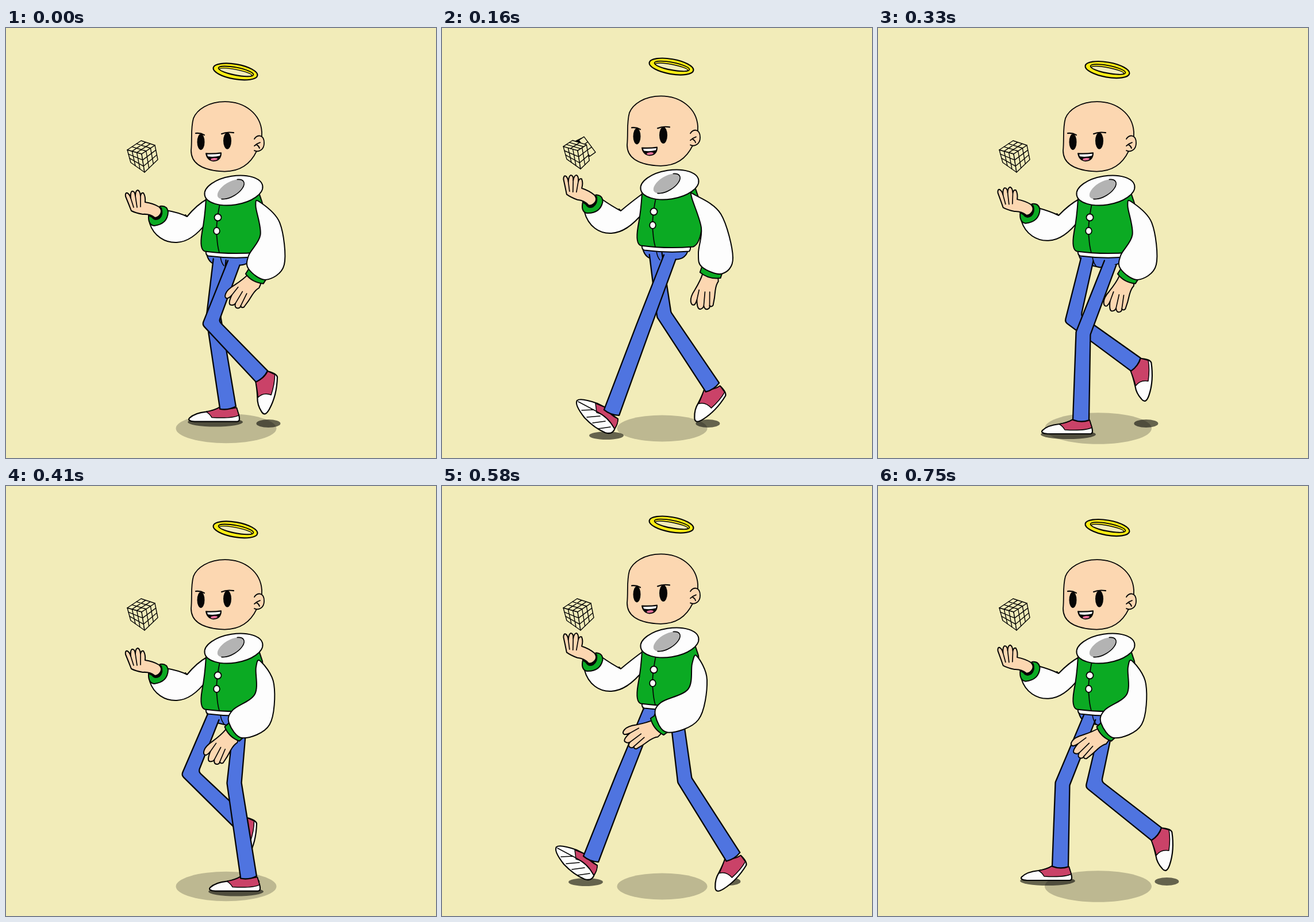
An HTML page with a canvas that plays this animation: 748x748 px, repeating every 830 ms.

```html
<!DOCTYPE html>
<html lang="en">
<head>
<meta charset="utf-8">
<title>Walk cycle</title>
<style>
html, body { margin: 0; height: 100%; overflow: hidden; background: #f2ecb9; }
canvas { display: block; width: 100vw; height: 100vh; }
</style>
</head>
<body>
<canvas id="stage" width="748" height="748"></canvas>
<script>
const ctx = document.getElementById('stage').getContext('2d');
const BG = '#f2ecb9', INK = '#050505', SKIN = '#fcd7b1', GREEN = '#0baa23',
      BLUE = '#4f74e0', RED = '#ca4268', WHITE = '#fdfdfd', YELLOW = '#fcec14';

const LOOP = 830, POSES = 10, STEP = 5;   // two steps per loop

// Key points of one leg at every second pose; the other leg runs half a loop later
const KNEE = [[356, 513], [351, 518], [357, 531], [432, 503], [398, 523]];
const ANKLE = [[445, 606], [295, 669], [353, 682], [486, 671], [503, 619]];

// Per pose of a step: torso drop and how far the open hand is raised
const DROP = [.5, -9.5, -9.5, 2.5, .5];
const RAISE = [0, .77, 1, .73, .2];

// Swinging sleeve fully back and fully forward; points 3 and 4 are the cuff
const BACK = [[434, 303], [451, 357], [446, 401], [452, 425], [487, 437], [506, 409], [485, 333], [440, 300]];
const FRONT = [[435, 319], [428, 363], [381, 386], [371, 408], [392, 438], [446, 416], [461, 347], [443, 305]];

const wave = turns => Math.cos(turns * 2 * Math.PI);
const smooth = t => { t = Math.min(1, Math.max(0, t)); return t * t * (3 - 2 * t); };
const lerp = (p, q, t) => p.map((v, i) => v + (q[i] - v) * t);

// Closed Catmull-Rom track through keys two poses apart
function track(keys, phase) {
  const k = Math.floor(phase / 2), t = phase / 2 - k;
  const [a, b, c, d] = [4, 0, 1, 2].map(n => keys[(k + n) % 5]);
  return b.map((v, i) => v + t / 2 * (c[i] - a[i] +
    t * (2 * a[i] - 5 * v + 4 * c[i] - d[i] + t * (3 * v - 3 * c[i] + d[i] - a[i]))));
}

function shape(d, fill, width = 2) {
  const p = typeof d === 'string' ? new Path2D(d) : d;
  if (fill) { ctx.fillStyle = fill; ctx.fill(p); }
  if (width) { ctx.lineWidth = width; ctx.strokeStyle = INK; ctx.stroke(p); }
}
function oval(x, y, rx, ry, deg, fill, width = 2, from = 0, to = 360) {
  const r = Math.PI / 180, p = new Path2D();
  p.ellipse(x, y, rx, ry, deg * r, from * r, to * r);
  shape(p, fill, width);
}
function at(x, y, deg, draw) {
  ctx.save();
  ctx.translate(x, y);
  ctx.rotate(deg * Math.PI / 180);
  draw();
  ctx.restore();
}
function poly(pts, fill, width) {
  shape('M' + pts.join('L') + 'Z', fill, width);
}

// Shoes drawn around the ankle, each with its shadow offset and radii
const FLAT = {
  sole: 'M-14-1Q0 4 15 0L19 13Q22 24 16 24L-58 24Q-71 23-67 18Q-58 9-38 7Q-24 5-14-1Z',
  upper: 'M-14-1Q0 4 15 0L19 13Q8 19-28 17Q-32 10-38 7Q-24 5-14-1Z',
  shade: [-22, 25, 48, 8]
};
const LIFTED = {
  sole: 'M-10 9Q4 5 9-10Q25-8 27-2Q30 30 20 55Q14 70 7 61Q-2 50-3 38Q-6 20-10 9Z',
  upper: 'M-10 9Q4 5 9-10L22-6Q24 10 20 30Q6 27-2 37Q-6 20-10 9Z',
  shade: [16, 0, 21, 7]
};
const STRIKE = {
  sole: 'M-11-9L-25-16Q-54-26-60-21Q-65-14-47 9Q-30 27-11 35Q2 39 6 27Q10 20 11 11Q0 4-11-9Z',
  upper: 'M-28-16L-11-9Q-2 5 11 11Q11 21 5 28Q-8 4-26 0Z',
  tread: 'M-58-19L-26-2Q-6 8 5 28M-52-4l21-1M-43 8l23-2M-33 18l22-3M-23 28l21-3',
  shade: [-9, 40, 30, 7]
};

function legPose(phase, bob, far) {
  const dx = far ? -36 : 0, depth = far ? 20 : 0;
  const place = ([x, y], k) => [x + dx, y - depth * k];
  const hip = place([402 + 7 * wave((phase - 6) / POSES), 408 + bob], .3);
  const knee = place(track(KNEE, phase), .65), ankle = place(track(ANKLE, phase), 1);
  const shoe = phase === 2 ? STRIKE : phase > 2 && phase < 7 ? FLAT : LIFTED;
  const fromTop = (phase + 6) % POSES - 5;   // poses from the highest lift
  const deg = shoe === LIFTED ? 10 * fromTop ** 2 - 3 : phase === 6 ? -13 : 0;
  return { hip, knee, ankle, shoe, deg };
}

function footShade({ ankle: [x, y], shoe, deg }) {
  const [dx, dy, rx, ry] = shoe.shade, up = shoe === LIFTED;
  oval(x + dx - (up ? deg * .65 : 0), up ? 688 : y + dy, rx, ry, 0, 'rgba(0,0,0,.58)', 0);
}

function leg({ hip: [hx, hy], knee: [kx, ky], ankle: [ax, ay], shoe, deg }) {
  at(ax, ay, deg, () => {
    shape(shoe.sole, WHITE, 2.2);
    shape(shoe.upper, RED, 1.5);
    if (shoe.tread) shape(shoe.tread, null, 1.6);
  });
  const unit = (x, y) => { const l = Math.hypot(x, y); return [x / l, y / l]; };
  const [ux, uy] = unit(kx - hx, ky - hy), [vx, vy] = unit(ax - kx, ay - ky);
  const m = 1 + ux * vx + uy * vy;
  const side = s => [
    [hx - uy * 11 * s, hy + ux * 11 * s],
    [kx - (uy + vy) / m * 12.5 * s, ky + (ux + vx) / m * 12.5 * s],
    [ax - vy * 14 * s, ay + vx * 14 * s]
  ];
  const a = side(1), b = side(-1), p = new Path2D();
  p.moveTo(...a[0]);
  p.arcTo(...a[1], ...a[2], 8);
  p.lineTo(...a[2]);
  p.quadraticCurveTo(ax + vx * 5, ay + vy * 5, ...b[2]);
  p.arcTo(...b[1], ...b[0], 8);
  p.lineTo(...b[0]);
  shape(p, BLUE, 2.3);
}

function raisedArm(up, bob) {
  const dx = -2.5 * up, dy = -21 * up, low = -16 * up;
  const ex = 315 - 4 * up, ey = 328 - 10 * up, by = 374 + low;
  shape(`M350 ${297 + bob}Q332 ${307 + bob * .7} ${ex} ${ey}Q${ex - 14} ${ey - 7} ${278 + dx} ${317 + dy}
    L${250 + dx} ${340 + dy}C${257 + dx} ${by - 12} ${277 + dx} ${by} ${297 + dx} ${by - 1}
    Q${324 + dx} ${by - 2} 350 ${337 + low}Z M${ex} ${ey}l-3-3`, WHITE);
  at(262 + dx, 322 + dy, 10 * up, () => {
    ctx.translate(-262, -322);
    shape('M268 310Q280 308 282 320Q281 341 258 344Q247 343 248 326Q256 332 264 326Q270 320 268 310Z', GREEN);
    shape('M252 326Q258 337 267 331Q274 324 270 313Z', INK);
    shape('M259 330Q250 323 238 324Q226 322 218 318Q213 305 208 293Q207 286 211 287Q215 289 217 296' +
      'Q216 286 219 284Q224 283 225 292Q225 283 229 282Q233 283 234 292Q235 286 239 287' +
      'Q243 293 242 303Q256 305 266 311Q272 316 269 323Q265 330 259 330Z', SKIN);
    shape('M217 296L222 312M225 292L228 312M234 292L234 311', null, 1.7);
  });
}

function swingArm(pose) {
  const off = Math.abs(pose - 7), away = Math.min(off, POSES - off);
  const forward = smooth((4.4 - away) / 3.4);
  const pts = BACK.map((p, i) => lerp(p, FRONT[i], forward));
  const [ax, ay] = pts[3], [bx, by] = pts[4], mx = (ax + bx) / 2, my = (ay + by) / 2;
  const l = Math.hypot(bx - ax, by - ay), nx = (ay - by) / l, ny = (bx - ax) / l;
  at(mx + nx * 9, my + ny * 9, 10 + 26 * wave((pose - 7.6) / POSES), () => {
    shape('M-12-6C-18 4-28 14-32 18Q-43 28-44 36Q-45 44-39 43Q-35 40-33 36Q-37 53-31 53Q-26 53-24 49' +
      'Q-24 57-18 56Q-14 55-14 51Q-12 55-8 52Q-2 40 2 28Q6 18 11 14Q13 8 12 2Z', SKIN);
    shape('M-33 36L-25 20M-24 49L-16 26M-14 51L-8 28', null, 1.7);
  });
  shape(`M${ax} ${ay}L${ax + nx * 10} ${ay + ny * 10}
    Q${mx + nx * 17} ${my + ny * 17} ${bx + nx * 8} ${by + ny * 8}L${bx} ${by}Z`, GREEN);
  const n = pts.length, p = new Path2D();
  p.moveTo(...pts[0]);
  for (let i = 0; i < n; i++) {
    const [a, b, c, d] = [n - 1, 0, 1, 2].map(k => pts[(i + k) % n]);
    p.bezierCurveTo(b[0] + (c[0] - a[0]) / 6, b[1] + (c[1] - a[1]) / 6,
      c[0] - (d[0] - b[0]) / 6, c[1] - (d[1] - b[1]) / 6, c[0], c[1]);
  }
  p.closePath();
  shape(p, WHITE);
}

function grid(a, b, c, d, nu, nv) {
  let s = '';
  for (let i = 1; i < nu; i++) s += `M${lerp(a, b, i / nu)}L${lerp(d, c, i / nu)}`;
  for (let i = 1; i < nv; i++) s += `M${lerp(a, d, i / nv)}L${lerp(b, c, i / nv)}`;
  poly([a, b, c, d], BG, 1.4);
  shape(s, null, 1.4);
}

// The back layer of the cube twists out around pose 2
function cube(pose) {
  const twist = Math.max(0, 1 - Math.abs(pose - 2.2) / 1.2), turned = twist > .01;
  const left = [211, 212], front = [236, 219], bottom = [241, 251];
  const n = turned ? 2 : 3, depth = n / 3;
  const top = lerp(left, [235, 196], depth), right = lerp(front, [259, 204], depth),
        low = lerp(bottom, [264, 229], depth);
  at(0, -7 * twist, 0, () => {
    if (turned) {
      poly([[231, 203], [243, 197], [264, 224], [252, 232]], INK, 1);
      grid([238, 201], [247, 195], [267, 222], [257, 229], 1, 3);
    }
    grid(left, front, bottom, [217, 234], 3, 3);
    grid(front, right, low, bottom, n, 3);
    grid(left, top, right, front, 3, n);
  });
}

function halo() {
  oval(399, 76, 39, 13, 10, YELLOW, 2.2);
  oval(400, 75.5, 31, 6.8, 11, YELLOW, 1.8);
  oval(399.5, 77, 28.5, 4.6, 11, BG, 1.4);
}

function head() {
  shape('M381 129C352 129 332 143 326 158C321 175 324 195 322 214C322 236 340 247 372 250' +
    'C405 253 425 238 436 215C442 205 446 195 445 182C443 150 415 129 381 129Z', SKIN, 1.8);
  shape('M432 194C436 186 449 185 449 201C449 212 440 218 432 214', SKIN, 1.8);
  shape('M432 206Q436 202 442 200M436 204Q440 206 441 210', null, 1.8);
  oval(339, 199, 6.5, 14, 0, INK, 0);
  oval(385, 197, 7, 14.5, 0, INK, 0);
  shape('M330 184Q338 183 345 187M375 185Q384 181 396 183', null, 2.2);
  shape('M348 219Q361 220 374 218Q374 231 361 232Q350 231 348 219Z', INK);
  shape('M350 220.500Q361 221 373 219.500L372 223Q361 226 351 224Z', WHITE, 0);
  oval(362, 229, 6, 2.2, -6, '#e8709a', 0);
}

function pelvis() {
  shape('M349 392Q352 408 365 411L386 416L408 412Q424 411 428 396Z', BLUE, 2);
}

function vest() {
  shape('M348 387Q347 395 352 396Q390 401 430 398Q433 395 432 386Z', WHITE);
  shape('M348 296Q346 330 341 355Q336 385 346 388Q390 394 437 390Q449 385 452 355L446 304L440 286Z', GREEN);
  shape('M372 305Q364 345 367 365Q368 380 371 390', null, 1.7);
  oval(368.5, 329, 6, 6, 0, WHITE, 1.8);
  oval(366.5, 352.5, 5.3, 6, 0, WHITE, 1.8);
  oval(396, 282, 51, 25, -9, WHITE);
  oval(391, 280, 26, 12.5, -31, '#b3b3b3', 0);
  oval(391, 280, 26, 12.5, -31, null, 1.6, -45, 150);
}

function draw(pose) {
  const beat = pose % STEP, bob = DROP[beat], shift = (y, part) => at(0, y, 0, part);
  const near = legPose(pose, bob, false), far = legPose((pose + STEP) % POSES, bob, true);
  const ground = 85 + 8 * wave((beat - 4) / STEP);
  ctx.fillStyle = BG;
  ctx.fillRect(0, 0, 748, 748);
  ctx.lineJoin = ctx.lineCap = 'round';
  oval(383, 696.5, ground, ground * .293, 0, 'rgba(0,0,0,.22)', 0);
  footShade(far);
  footShade(near);
  shift(bob, pelvis);
  leg(far);
  shift(bob, () => shape('M373 397Q374 407 379 413', null, 1.6));
  leg(near);
  raisedArm(RAISE[beat], bob);
  shift(bob, () => { vest(); swingArm(pose); });
  shift(-5.2 + 5.4 * wave((beat - 4.5) / STEP), head);
  shift(-5 + 4.9 * wave(beat / STEP), halo);
  cube(pose);
}

// Poses switch hard, on times rounded down to 10 ms
const start = i => Math.floor(LOOP / POSES * i / 10 + .05) * 10;
let shown = -1;
function tick() {
  const t = performance.now() % LOOP;
  let pose = POSES - 1;
  while (start(pose) > t) pose--;
  if (pose !== shown) draw(shown = pose);
  requestAnimationFrame(tick);
}
tick();
</script>
</body>
</html>
```
